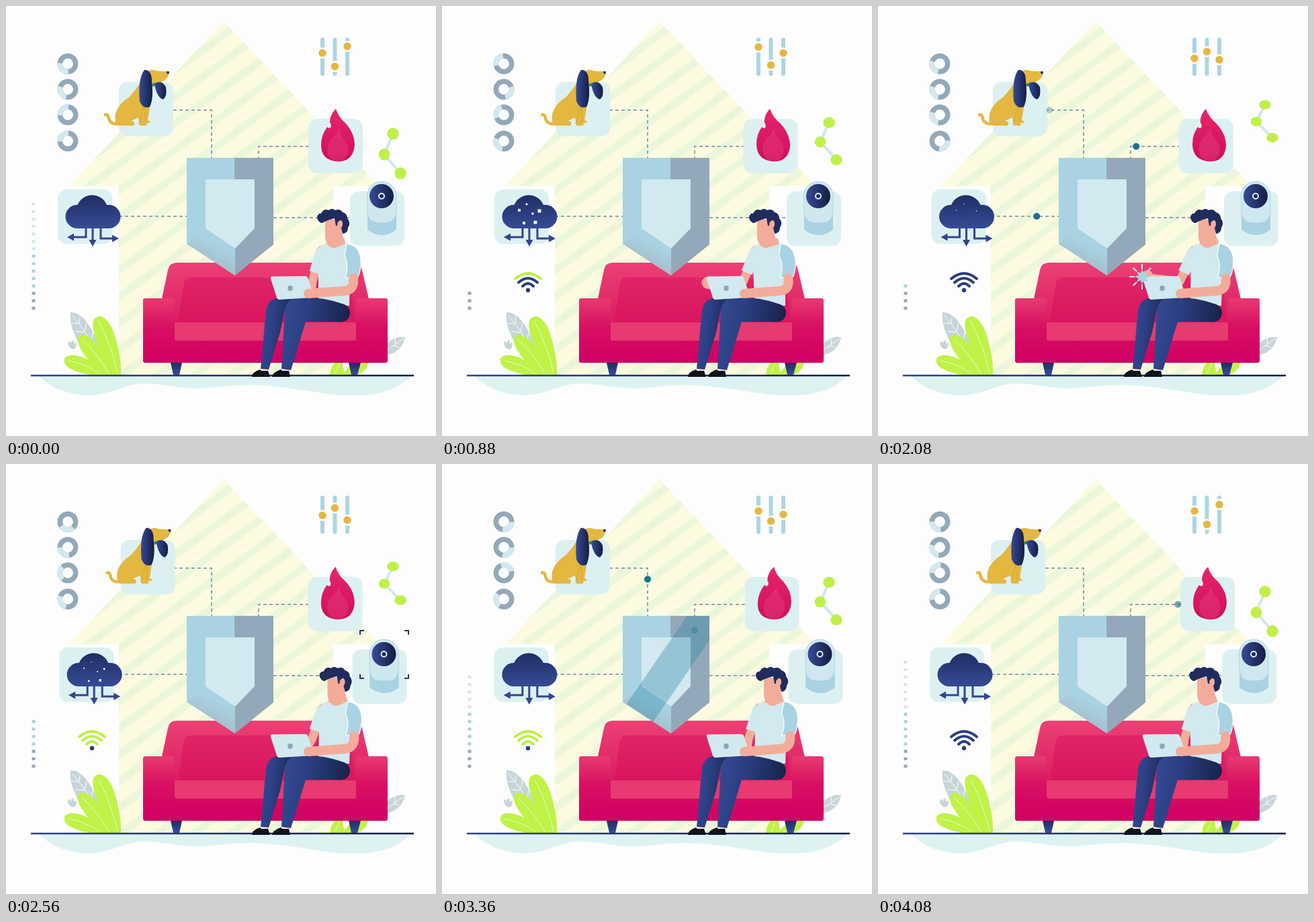
Animation of 640 by 640 pixels, one loop 4.16 s. Source, as an HTML page:

```html
<!DOCTYPE html>
<html lang="en">
<head>
<meta charset="utf-8">
<title>Smart home security</title>
<style>
html,body{margin:0;width:100%;height:100%;overflow:hidden;background:#fdfdfd}
svg{display:block;width:100vw;height:100vh}
</style>
</head>
<body>
<svg viewBox="0 0 640 640" fill="none">
<defs>
  <pattern id="stripes" width="32" height="32" patternUnits="userSpaceOnUse" patternTransform="translate(324 36) rotate(-36)">
    <path d="M0 0H32V11H0Z" fill="#ebf6da"/>
  </pattern>
  <linearGradient id="navy" x2="0" y2="1"><stop stop-color="#202e63"/><stop offset="1" stop-color="#364b97"/></linearGradient>
  <linearGradient id="lens"><stop stop-color="#364b97"/><stop offset="1" stop-color="#141d42"/></linearGradient>
  <linearGradient id="ground" gradientUnits="userSpaceOnUse" x1="37" x2="607"><stop stop-color="#2f4389"/><stop offset="1" stop-color="#141d42"/></linearGradient>
  <linearGradient id="jeans" x2="1" y2=".2"><stop stop-color="#364b97"/><stop offset=".4" stop-color="#2c3f83"/><stop offset="1" stop-color="#18224a"/></linearGradient>
  <linearGradient id="back" x2="0" y2="1"><stop stop-color="#ec4175"/><stop offset="1" stop-color="#d91b60"/></linearGradient>
  <linearGradient id="arm" x2="0" y2="1"><stop stop-color="#e73a70"/><stop offset=".45" stop-color="#d80f62"/><stop offset="1" stop-color="#d00063"/></linearGradient>
  <linearGradient id="pad" x2="0" y2="1"><stop stop-color="#df2465"/><stop offset="1" stop-color="#da155f"/></linearGradient>
  <linearGradient id="fire" x2="0" y2="1"><stop stop-color="#e8266a"/><stop offset="1" stop-color="#cf0d5d"/></linearGradient>
  <linearGradient id="bevel" x1=".6" y1=".3" x2=".4" y2=".7"><stop stop-color="#a9d3e2"/><stop offset="1" stop-color="#a5bfce"/></linearGradient>
  <clipPath id="shieldClip"><path d="M269 226H398V355L341 401L269 354Z"/></clipPath>
</defs>

<path d="M324 23L94 268H168V549H487V268H556Z" fill="#fcfbdf"/>
<path d="M324 23L94 268H168V549H487V268H556Z" fill="url(#stripes)"/>

<path d="M48 550C70 572 100 581 130 579C165 575 175 563 205 562C240 562 260 571 295 569C330 566 350 562 385 565C430 568 460 576 495 579C540 582 575 578 604 550Z" fill="#def2f2"/>

<!-- plants -->
<path d="M96 456C112 454 134 478 148 540C120 528 92 484 96 456Z" fill="#c7d5d9"/>
<path d="M99 461Q122 488 146 532M109 473l1-10M117 484l3-13M126 498l4-13M107 473l-9 -1M116 486l-13-2M127 502l-14-2" stroke="#fff"/>
<path d="M92 499q5 1 5 5q-1-5 2-7q3 3 2 7q1-3 4-3q0 9-5 10q-8-1-8-12" fill="#c7d5d9"/>
<g fill="#c0f247">
  <path d="M132 465C142 456 156 468 163 494C169 515 172 535 171 549H160C142 520 122 477 132 465Z"/>
  <path d="M110 490C126 483 150 520 160 549H143C122 528 98 500 110 490Z"/>
  <path d="M87 525C94 513 128 522 150 549H124C106 545 84 539 87 525Z"/>
  <path d="M482 549Q484 529 500 526L504 549ZM501 549Q520 520 540 528Q536 547 520 549Z"/>
</g>
<path d="M138 470Q157 505 166 547M113 496Q138 520 153 547M93 528Q118 532 139 547M490 547L497 530M510 547L532 531" stroke="#e5facb"/>
<path d="M594 493C580 490 564 500 556 520C572 522 590 513 594 493Z" fill="#c7d5d9"/>
<path d="M592 495L560 517M580 504l-1-9M577 506l8 2" stroke="#fff"/>

<g id="rings" stroke-width="7.5"/>
<g id="sliders"/>
<g id="bars"/>

<g id="net" fill="#bff048">
  <path id="netLine" fill="none" stroke="#cfe7ee" stroke-width="4"/>
  <ellipse cx="576" rx="8.700"/><ellipse cx="563" rx="8.300"/><ellipse cx="587" rx="8.700"/>
</g>

<path d="M249 155H306V226M451 209H376V226M168 313H269M398 315H516" stroke="#91a4b6" stroke-width="2" stroke-dasharray="5 4"/>

<!-- dog -->
<g id="dog">
  <rect x="168" y="113" width="81" height="81" rx="13" fill="#dcf0f1"/>
  <path d="M167 175Q156 177 153 168Q152 160 148 162" stroke="#e4b740" stroke-width="4.500" stroke-linecap="round"/>
  <path d="M200 114Q193 125 184 135Q167 146 163 160Q161 172 166 178H190Q194 172 186 171L197 166L199 178H209Q211 173 206 172L207 174H214Q216 172 211 170L215 145L219 112Z" fill="#e4b740"/>
  <path d="M205 150L198 176M207 150V172" stroke="#d3a32f"/>
  <path d="M204 104Q209 95 220 95Q226 98 239 97Q244 98 242 103Q238 113 224 115L205 122Z" fill="#e4b740"/>
  <circle cx="241" cy="99" r="2" fill="#1d2a5c"/>
  <path d="M218 118l9-3" stroke="#23876f" stroke-width="4"/>
  <path d="M221 117Q231 108 238 121Q240 135 234 139Q225 137 221 117Z" fill="url(#lens)"/>
  <path d="M206 95Q217 95 217 112Q220 138 214 150Q204 154 199 142Q196 108 206 95Z" fill="url(#lens)"/>
</g>

<!-- cloud -->
<g id="cloud">
  <rect x="77" y="273" width="81" height="81" rx="13" fill="#dcf0f1"/>
  <path d="M119 328V344H99M129 328V350M141 328V346H161" stroke="#31468e" stroke-width="3"/>
  <path d="M91 344l10-5.500v11ZM129 358l-5.500-10h11ZM168 346l-10-5.500v11Z" fill="#31468e"/>
  <path d="M106 331A17.500 17.500 0 0 1 106 296H106.500A23.500 23.500 0 0 1 150 296H153A17.500 17.500 0 0 1 153 331Z" fill="url(#navy)"/>
  <g id="bits" fill="#fff"/>
</g>

<!-- flame -->
<g id="fireTile"><rect x="450" y="168" width="81" height="81" rx="13" fill="#dcf0f1"/></g>
<g id="flame">
  <path d="M491 153Q495 166 505 174Q519 189 519 207Q517 231 494 231.500Q469 230 469 207Q469 192 478 180Q480 183 483 181Q485 178 482 173Q482 162 491 153Z" fill="url(#fire)"/>
  <path d="M496 180Q496 191 504 199Q512 211 508 221Q504 231 494 231Q478 229 478 213Q479 201 488 194Q495 188 496 180Z" fill="#e8457a" opacity=".4"/>
</g>

<!-- camera -->
<g id="camera">
  <rect x="512" y="276" width="81" height="81" rx="13" fill="#dcf0f1"/>
  <path d="M538 308H581V333Q560 349 538 333Z" fill="#a9d2e2"/>
  <rect x="537.500" y="261" width="43.500" height="65" rx="21.500" fill="#cfe7ee" stroke="#b4d8e4"/>
  <path d="M538 318Q560 327 581 318V332Q560 342 538 332Z" fill="#a9d2e2"/>
  <circle cx="559" cy="283" r="18" fill="url(#lens)"/>
  <circle cx="559" cy="283" r="4" fill="#1d2a5c" stroke="#dcf0f1" stroke-width="2"/>
</g>
<path id="focus" d="M527 254V248H533M593 248H599V254M527 313V319H533M593 319H599V313" stroke="#24356f" stroke-width="2"/>

<g id="wifi" stroke-width="4" stroke-linecap="round">
  <circle cx="128" cy="423" r="3.200" fill="#2a3d80"/>
  <path d="M120 417Q128 409 136 417"/><path d="M114 411.500Q128 399 142 411.500"/><path d="M109 406Q128 390 147 406"/>
</g>

<!-- sofa -->
<path d="M245 531H262L258 549H249ZM510 531H528L523 549H514Z" fill="url(#navy)"/>
<path d="M230 445L241 393Q243 382 254 382H518Q528 382 530 393L542 445V475H230Z" fill="url(#back)"/>
<path d="M256 472L265 412Q267 404 275 404H500Q510 404 512 412L520 472Z" fill="url(#pad)"/>
<path d="M204 438Q204 435 207 435H248Q251 435 251 438V472H521V438Q521 435 524 435H565Q568 435 568 438V528Q568 531 565 531H207Q204 531 204 528Z" fill="url(#arm)"/>
<path d="M251 471H521V495Q521 498 518 498H254Q251 498 251 495Z" fill="#e63a70"/>
<path d="M204 472H251M521 472H568" stroke="#ca0960" opacity=".5"/>

<!-- shield -->
<path d="M269 226H341V401L269 354Z" fill="#a9d3e2"/>
<path d="M340 226H398V355L341 401Z" fill="#93a9b9"/>
<path d="M269 354L297 331L341 361V401Z" fill="url(#bevel)"/>
<path d="M297 258H370V331L341 361L297 331Z" fill="#d1e9ef"/>
<g clip-path="url(#shieldClip)"><path id="gloss" fill="#2a86a3" opacity=".36"/></g>
<g id="dots" fill="#1b7090"/>

<path d="M37 550H607" stroke="url(#ground)" stroke-width="2.500"/>

<!-- man -->
<path d="M381 538H392V545H380ZM410 538H423V545H410Z" fill="#f7e3de"/>
<path d="M366 552Q366 545 378 541L380 543H390L393 552ZM396 552Q397 545 409 541L411 543H421L423 552Z" fill="#10121c"/>
<path d="M404 435Q391 436 387 452L379 540L391 541L408 486L414 456Q418 440 434 434Z" fill="url(#jeans)"/>
<g stroke-linecap="round" stroke-linejoin="round">
  <path id="farArm" stroke="#f3ac9a" stroke-width="13"/>
  <path id="farSleeve" stroke="#d1e9ef" stroke-width="17" stroke-linecap="butt"/>
</g>
<g id="hand" fill="#f3ac9a"><ellipse rx="8.500" ry="9"/></g>
<g id="torso">
  <path d="M480 352Q464 357 461 368Q465 385 465 400V446H511L512 404L524 403Q530 385 527 370Q522 354 503 352Z" fill="#d1e9ef"/>
  <path d="M507 354Q525 355 528 376Q529 392 524 403L505 404Q511 385 504 372Z" fill="#a9d3e2" stroke="#fff" stroke-width="1.200"/>
  <path d="M480 348L503 346L505 353Q494 362 478 354Z" fill="#f3ac9a"/>
</g>
<g id="head">
  <path d="M475 316L475 345Q478 361 490 360L505 353L500 338L503 320Z" fill="#f3ac9a"/>
  <path d="M466 321Q460 314 466 309Q470 309 470 307Q474 301 480 304Q485 300 490 304Q497 301 501 307Q508 309 508 316Q514 322 509 330Q509 338 501 339L499 330Q503 323 499 319Q494 318 494 327H491L489 316Q480 318 474 321Q470 325 466 321Z" fill="#1f2c5d"/>
  <ellipse cx="497" cy="325" rx="4" ry="5" fill="#f3ac9a"/>
</g>
<path d="M433 434Q418 435 415 453L410 540L424 542L446 470H493Q512 472 512 455Q511 446 500 443Q470 432 433 434Z" fill="url(#jeans)"/>
<path d="M396 402.500L445 402Q448 402 449 404L458 431Q458 434 455 434L407 437Q404 437 403 434L394 406Q393 403 396 402.500Z" fill="#d1e9ef"/>
<ellipse cx="423" cy="420" rx="3.800" ry="4" fill="#8fa5b7"/>
<path id="nearArm" stroke="#f3ac9a" stroke-width="14" stroke-linecap="round"/>
<g id="spark" transform="translate(393 403)">
  <path fill="#a9d3e2" id="star"/><path stroke="#d1e9ef" stroke-width="2" stroke-linecap="round" id="rays"/>
</g>
</svg>

<script>
const LOOP = 4160, STEP = 80;
const $ = id => document.getElementById(id);
const set = (el, attrs) => { for (const k in attrs) el.setAttribute(k, attrs[k]); return el; };
const add = (id, tag, attrs) =>
  set($(id).appendChild(document.createElementNS("http://www.w3.org/2000/svg", tag)), attrs);
const move = (id, x, y = 0) => set($(id), { transform: `translate(${x} ${y})` });
const show = (el, on) => set(el, { visibility: on ? "visible" : "hidden" });
const clamp = v => Math.max(0, Math.min(1, v));
const ease = v => (1 - Math.cos(Math.PI * v)) / 2;

// Value at time t through pairs [time, value]; it returns to the first value at the loop end.
function track(t, keys, curve = ease) {
  const k = [...keys, LOOP, keys[1]];
  let i = 0;
  while (k[i + 2] <= t) i += 2;
  return k[i + 1] + (k[i + 3] - k[i + 1]) * curve((t - k[i]) / (k[i + 2] - k[i]));
}

const POSES = [0, 880, 1360, 2080, 3040, 3360];
const pose = (t, values) => track(t, POSES.flatMap((time, i) => [time, values[i]]));

const ringAngles = [
  [135, 215, 265, 150, 45, 50],
  [150, 30, 90, 150, 110, 50],
  [225, 205, 160, 150, 205, 300],
  [225, 150, 140, 45, 260, 170]
];
const rings = [86, 124, 162, 201].map(cy => {
  add("rings", "circle", { cx: 92, cy, r: 11.7, stroke: "#93a9b9" });
  return add("rings", "circle", { cx: 92, cy, r: 11.7, stroke: "#d1e9ef", "stroke-dasharray": "20 60" });
});

const knobPaths = [[70, 61, 61, 78, 75, 70], [90, 88, 88, 68, 63, 85], [60, 70, 77, 80, 87, 75]];
const knobs = [471, 489.5, 508].map(x => {
  add("sliders", "rect", { x: x - 3, y: 47, width: 6, height: 57, rx: 3, fill: "#acd5e3" });
  return add("sliders", "circle", { cx: x, r: 7, fill: "#e6b740", stroke: "#fdfdfd", "stroke-width": 2.5 });
});

const bars = Array.from({ length: 15 }, (_, i) => add("bars", "rect", {
  x: 38.5, y: 447.5 - i * 11.05, width: 5, height: 4.5,
  fill: i < 3 ? "#93a9b9" : i < 8 ? "#a9d3e2" : "#d1e9ef"
}));

const bits = [[125, 295], [114, 304], [144, 305], [134, 309], [121, 323], [138, 322]]
  .map(([x, y], i) => ({ x, y, size: 3 + i % 3, el: add("bits", "rect", {}) }));

const wifi = [...$("wifi").children];
const nodes = [...$("net").querySelectorAll("ellipse")];

// Signals travelling along the connectors: path points, run starts, run length.
const signals = [
  { pts: [[306, 248], [306, 155], [255, 155]], runs: [1345, 2965], span: 760 },
  { pts: [[448, 209], [376, 209], [376, 248]], runs: [1790, 2850, 4040], span: 530 },
  { pts: [[172, 313], [272, 313]], runs: [1150, 1790], span: 490 },
  { pts: [[510, 315], [400, 315]], runs: [950], span: 500 }
].map(s => ({ ...s, el: add("dots", "circle", { r: 5 }) }));

function along(pts, p) {
  const lens = pts.slice(1).map(([x, y], i) => Math.hypot(x - pts[i][0], y - pts[i][1]));
  let d = p * lens.reduce((a, b) => a + b), i = 0;
  while (i < lens.length - 1 && d > lens[i]) d -= lens[i++];
  const f = d / lens[i], [a, b] = [pts[i], pts[i + 1]];
  return [a[0] + (b[0] - a[0]) * f, a[1] + (b[1] - a[1]) * f];
}

const polar = (r, a) => `${(r * Math.cos(a)).toFixed(1)} ${(r * Math.sin(a)).toFixed(1)}`;

function drawMan(t) {
  const lean = pose(t, [0, -6, -8.5, 2, 5, 4]);
  const c = -lean * .4 / 75;
  move("head", lean);
  set($("torso"), { transform: `matrix(1 0 ${c} 1 ${-c * 445} 0)` });

  const hx = track(t, [0, 450, 480, 450, 880, 395, 1360, 390, 2080, 401, 2240, 401, 2640, 450]);
  const hy = track(t, [0, 421, 480, 421, 880, 412, 1360, 403, 2080, 402, 2240, 402, 2640, 418]);
  const shoulder = [470 + lean * .4, 363], elbow = [456 + (hx - 450) * .14, 410];
  const cuff = shoulder.map((v, i) => v + (elbow[i] - v) * .72);
  set($("farArm"), { d: `M${shoulder}L${elbow}L${hx + 4} ${hy + 3}` });
  set($("farSleeve"), { d: `M${shoulder}L${cuff}` });
  move("hand", hx, hy);
  set($("nearArm"), { d: `M${517 + lean * .3} 405Q${519 + lean * .2} 423 503 424L450 428` });

  show($("spark"), t >= 2000 && t < 2240);
  const grow = .6 + .4 * clamp((t - 1920) / 160);
  let star = "M", rays = "";
  for (let i = 0; i < 16; i++) {
    const a = i * Math.PI / 8;
    star += polar((i % 2 ? 6 : 11) * grow, a) + (i < 15 ? "L" : "Z");
    if (i % 2 == 0) rays += `M${polar(12 * grow, a)}L${polar(18 * grow, a)}`;
  }
  set($("star"), { d: star });
  set($("rays"), { d: rays });
}

function draw(t) {
  const swing = (1 - Math.cos(2 * Math.PI * t / LOOP)) / 2;

  rings.forEach((r, i) => set(r, {
    transform: `rotate(${pose(t, ringAngles[i]) - 49} 92 ${r.getAttribute("cy")})`
  }));
  knobs.forEach((k, i) => set(k, { cy: pose(t, knobPaths[i]) }));

  const count = Math.round(track(t, [0, 15, 1100, 0, 1560, 0, 3600, 15], v => v));
  bars.forEach((b, i) => show(b, i < count));

  const ys = [190 - 43 * swing, 221 - 49 * swing, 249 - 53 * swing];
  nodes.forEach((n, i) => set(n, { cy: ys[i], ry: 8.7 - 1.7 * swing }));
  set($("netLine"), { d: `M576 ${ys[0]}L563 ${ys[1]}L587 ${ys[2]}` });

  move("dog", 3 * swing);
  move("cloud", 2.5 * swing);
  move("fireTile", pose(t, [0, -1.5, -2.5, -2, 1.3, .7]));
  move("camera", pose(t, [0, 1, 2, 3, 4, 3.5]));
  const tip = pose(t, [0, -3, -3, -3, 2, 3]) / -78;
  set($("flame"), { transform: `matrix(1 0 ${tip} 1 ${-tip * 231} 0)` });
  show($("focus"), t >= 2480 && t < 3280);

  bits.forEach((b, i) => {
    const pulse = s => Math.sin(Math.PI * clamp((t - s - i * 30) / 640));
    const s = b.size * Math.max(pulse(480), pulse(2000 - i * 15));
    set(b.el, { x: b.x - s / 2, y: b.y - s / 2, width: s, height: s });
  });

  const phase = t % 1000;
  wifi.forEach((w, i) => {
    show(w, t >= 80 + i * 80);
    if (i) set(w, {
      stroke: phase >= 80 + i * 80 && phase < 520 + i * 130 ? "#bff048" : "#2a3d80"
    });
  });

  const x = 257 + (t - 3040) * .3375;
  show($("gloss"), t >= 2880 && t < 3760);
  set($("gloss"), { d: `M${x} 226h58l-124 180h-58Z` });

  signals.forEach(s => {
    const start = s.runs.find(r => t >= r && t < r + s.span);
    show(s.el, start !== undefined);
    if (start === undefined) return;
    const p = (t - start) / s.span, [cx, cy] = along(s.pts, ease(p));
    set(s.el, { cx, cy, opacity: clamp(Math.min(p, 1 - p) * 7 + .1) });
  });

  drawMan(t);
}

const begin = performance.now();
function tick() {
  const t = (performance.now() - begin) % LOOP;
  draw(Math.floor(t / STEP) * STEP);
  requestAnimationFrame(tick);
}
tick();
</script>
</body>
</html>
```
